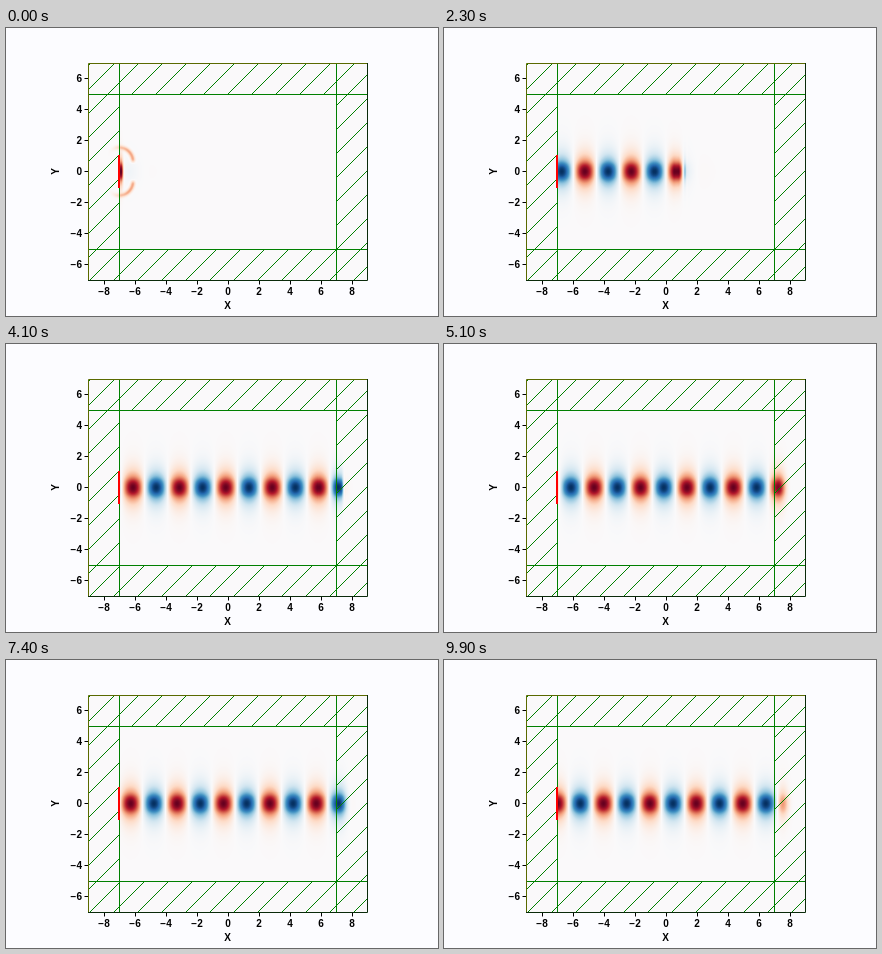
These frames come from a looping animation (432x288 px, 10 s). An HTML page with a canvas:

```html
<!DOCTYPE html>
<html lang="en">
<head>
<meta charset="utf-8">
<title>Wave in a straight guide</title>
<style>
  html, body { margin: 0; width: 100%; height: 100%; overflow: hidden; background: #fcfcff; }
  canvas, svg { position: absolute; left: 0; top: 0; }
  canvas { left: 82px; top: 35px; }
  path { fill: none; }
  text { font: bold 10px "Liberation Sans", Arial, sans-serif; }
</style>
</head>
<body>
<canvas id="field" width="279" height="217"></canvas>
<svg id="plot" width="432" height="288" viewBox="0 0 432 288">
  <defs>
    <clipPath id="sides"><path d="M82 35H113V252H82Z M330 35H361V252H330Z"/></clipPath>
    <clipPath id="bands"><path d="M82 35H361V66H82Z M82 221H361V252H82Z"/></clipPath>
    <path id="hatch"/>
  </defs>
  <g stroke="#008000">
    <g clip-path="url(#sides)"><use href="#hatch"/></g>
    <g clip-path="url(#bands)"><use href="#hatch"/></g>
    <path d="M113.5 35V252 M330.5 35V252 M82 66.5H361 M82 221.5H361"/>
  </g>
  <rect x="112" y="127" width="2" height="33" fill="#f00"/>
  <path d="M82.5 252.5V35.5H361.5" stroke="#5a6a00"/>
  <path d="M82 252.5H361.5V35" stroke="#0a2a0a"/>
  <path id="ticks" stroke="#000"/>
  <g id="labels">
    <text x="221.5" y="281" text-anchor="middle">X</text>
    <text transform="translate(53 143.5) rotate(-90)" text-anchor="middle">Y</text>
  </g>
</svg>
<script>
const UNIT = 15.5, LEFT = 82, TOP = 35, SOURCE_X = 113, MID_Y = 143.5;
const FRAMES = 100, STEP = 100;
const HALF_WAVE = 23.2, FREQ = 0.15, FRONT_SPEED = 5.4;

const el = id => document.getElementById(id);

function drawAxes() {
  let hatch = "", ticks = "";
  for (let s = 120; s < 620; s += 24) hatch += `M${s - 300} 300L${s} 0`;
  const label = (text, x, y, anchor) => {
    const t = document.createElementNS("http://www.w3.org/2000/svg", "text");
    t.setAttribute("x", x);
    t.setAttribute("y", y);
    t.setAttribute("text-anchor", anchor);
    t.textContent = String(text).replace("-", "\u2212");
    el("labels").append(t);
  };
  for (let v = -8; v <= 8; v += 2) {
    const x = 222 + v * UNIT, y = MID_Y - v * UNIT;
    ticks += `M${Math.floor(x) + 0.5} 253v3.5`;
    label(v, x, 267, "middle");
    if (Math.abs(v) > 6) continue;
    ticks += `M82 ${Math.floor(y) + 0.5}h-3.5`;
    label(v, 76, y + 3.6, "end");
  }
  el("hatch").setAttribute("d", hatch);
  el("ticks").setAttribute("d", ticks);
}

// Diverging palette, from negative (blue) to positive (red)
const STOPS = ["053061", "2166ac", "4393c3", "92c5de", "d1e5f0", "faf9fa",
  "fddbc7", "f4a582", "d6604d", "b2182b", "67001f"]
  .map(h => [0, 2, 4].map(i => parseInt(h.slice(i, i + 2), 16)));

const PALETTE = Array.from({ length: 513 }, (_, i) => {
  const p = i / 512 * 10, k = Math.min(9, Math.floor(p));
  return STOPS[k].map((c, j) => c + (STOPS[k + 1][j] - c) * (p - k));
});

const clamp = (v, a, b) => Math.max(a, Math.min(b, v));
const smooth = v => { v = clamp(v, 0, 1); return v * v * (3 - 2 * v); };

// Transverse profile: cosine in the core, exponential tail outside
function mode(dy) {
  const u = Math.abs(dy) / UNIT;
  return u < 0.5 ? Math.cos(1.66 * u) : 0.675 * Math.exp(-1.87 * (u - 0.5));
}

// Guided wave along the axis: amplitude and lateral narrowing at column x
function column(x, t) {
  if (x < SOURCE_X) return { amp: 0, power: 1 };
  const behind = SOURCE_X + 1 + FRONT_SPEED * t - x;
  const inside = Math.max(behind, 0);
  const near = Math.exp(-inside / 8);
  const chirp = 2 * Math.exp(-inside / 5);
  const wave = Math.cos(Math.PI * (x - 150.2) / HALF_WAVE - 2 * Math.PI * FREQ * (t - 32) + chirp);
  const ahead = 0.1 * Math.exp(Math.min(behind, 0) / 8);
  const gate = Math.max(smooth(behind / 5) * (1 + 0.4 * near), ahead);
  const depth = Math.max(0, (x - 330.5) / 31);
  return {
    amp: clamp(wave * gate, -1, 1) * Math.exp(-22 * depth ** 3),
    power: behind > 0 ? 1 + 0.5 * near : 1
  };
}

// Faint ring radiated into the open at switch-on
function ring(dx, dy, t) {
  const d = Math.hypot(dx, Math.max(Math.abs(dy) - 10, 0));
  const off = (d - UNIT * t + 1.5) / 2.2;
  const side = smooth((dx + 12) / 24);
  return 0.4 * Math.exp(-off * off - (t - 1) / 1.2) * side * smooth((Math.abs(dy) - 7) / 6);
}

const ctx = el("field").getContext("2d");
const image = ctx.createImageData(279, 217);
const values = new Float32Array(279 * 217);

function drawField(t) {
  const { width, height, data } = image;
  const cols = Array.from({ length: width }, (_, i) => column(LEFT + i + 0.5, t));
  const peak = cols.reduce((m, c) => Math.max(m, Math.abs(c.amp)), 0.01);
  for (let j = 0; j < height; j++) {
    const dy = TOP + j + 0.5 - MID_Y, profile = mode(dy);
    for (let i = 0; i < width; i++) {
      const c = cols[i];
      let v = c.amp / peak * (c.power === 1 ? profile : profile ** c.power);
      if (t < 7) v += ring(LEFT + i + 0.5 - SOURCE_X, dy, t);
      values[j * width + i] = v;
    }
  }
  values.forEach((v, i) => {
    const rgb = PALETTE[Math.round((clamp(v, -1, 1) + 1) * 256)];
    data[4 * i] = rgb[0];
    data[4 * i + 1] = rgb[1];
    data[4 * i + 2] = rgb[2];
    data[4 * i + 3] = 255;
  });
  ctx.putImageData(image, 0, 0);
}

let shown = -1;
const start = performance.now();

function tick() {
  const n = Math.floor((performance.now() - start) / STEP) % FRAMES;
  if (n !== shown) drawField((shown = n) + 1);
  requestAnimationFrame(tick);
}

drawAxes();
tick();
</script>
</body>
</html>
```
